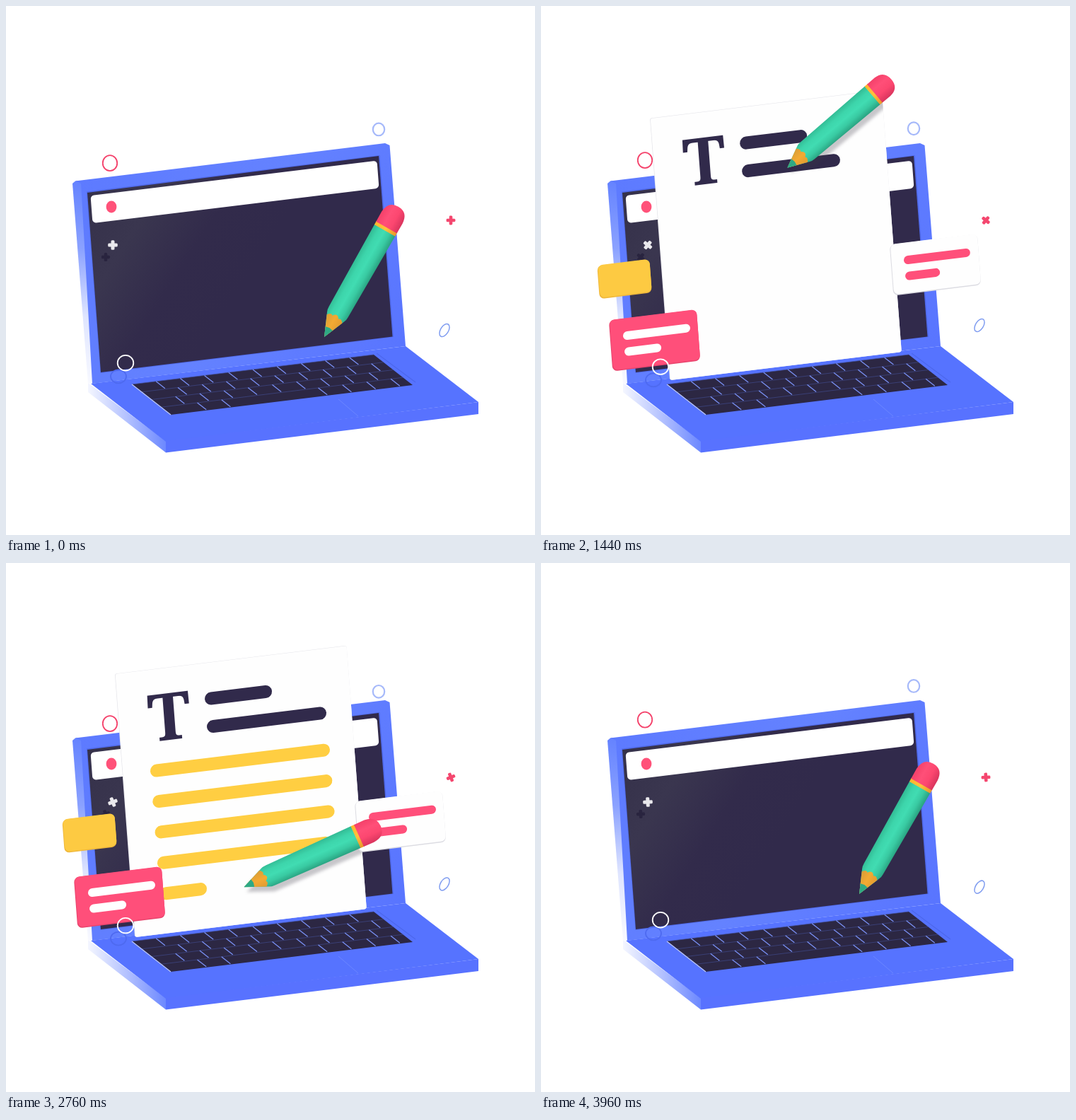
Recreate the animation shown at these times as an HTML page with a canvas. Size 748 by 748 pixels, loop 4000 ms.

```html
<!DOCTYPE html>
<html lang="en">
<head>
<meta charset="utf-8">
<title>Writing on a laptop</title>
<style>
  html, body { margin: 0; width: 100%; height: 100%; overflow: hidden; background: #fff; }
  canvas { display: block; }
</style>
</head>
<body>
<canvas id="stage" width="748" height="748"></canvas>
<script>
const ctx = document.getElementById('stage').getContext('2d');
const LOOP = 4000, NAVY = '#312a4b', PINK = '#ff4f7a', YELLOW = '#ffce42';
const PAPER = { x: 154.5, y: 156, w: 327, h: 373 };
const SLOPE = -.122, LEAN = .076;   // axes of every plane parallel to the screen

// Easing and timing
const clamp = v => Math.min(1, Math.max(0, v));
const span = (t, start, length) => clamp((t - start) / length);
const mix = (a, b, p) => a + (b - a) * p;
const easeOut = p => 1 - (1 - p) ** 3;
const easeInOut = p => p < .5 ? 4 * p ** 3 : 1 - 4 * (1 - p) ** 3;
const smooth = p => p * p * (3 - 2 * p);
const backOut = p => 1 + 2.3 * (p - 1) ** 3 + 1.3 * (p - 1) ** 2;
const wave = (t, delay) => Math.sin(Math.PI * (t - delay) / 1000);
const grow = (t, start, length = 400) => easeOut(span(t, start, length));

// Drawing helpers
function scoped(draw) {
  ctx.save();
  draw();
  ctx.restore();
}
function poly(fill, ...points) {
  ctx.beginPath();
  points.forEach(([x, y]) => ctx.lineTo(x, y));
  ctx.closePath();
  ctx.fillStyle = fill;
  ctx.fill();
}
function line(color, width, x1, y1, x2, y2) {
  ctx.beginPath();
  ctx.moveTo(x1, y1);
  ctx.lineTo(x2, y2);
  ctx.strokeStyle = color;
  ctx.lineWidth = width;
  ctx.stroke();
}
function box(fill, x, y, w, h, r) {
  ctx.beginPath();
  ctx.roundRect(x, y, w, h, r);
  ctx.fillStyle = fill;
  ctx.fill();
}
function ring(color, width, x, y, rx, ry, tilt = 0) {
  ctx.beginPath();
  ctx.ellipse(x, y, rx, ry, tilt, 0, 7);
  ctx.strokeStyle = color;
  ctx.lineWidth = width;
  ctx.stroke();
}
function blend(x1, y1, x2, y2, ...colors) {
  const g = ctx.createLinearGradient(x1, y1, x2, y2);
  colors.forEach((c, i) => g.addColorStop(i / (colors.length - 1), c));
  return g;
}
function onPlane(x, y, scale, draw) {
  scoped(() => {
    ctx.transform(scale, SLOPE * scale, LEAN * scale, scale, x, y);
    draw();
  });
}
function bar(color, width, x, y, length, amount) {
  if (amount <= 0) return;
  scoped(() => {
    ctx.lineCap = 'round';
    line(color, width * Math.min(1, amount * 6), x, y, x + length * amount, y);
  });
}
function plus(color, x, y, arm, width, t) {
  scoped(() => {
    ctx.translate(x, y);
    ctx.rotate(t / LOOP * 2 * Math.PI);
    box(color, -arm, -width / 2, 2 * arm, width, 1.5);
    box(color, -width / 2, -arm, width, 2 * arm, 1.5);
  });
}

function laptop() {
  // Base
  poly(blend(116, 0, 226, 0, '#f4f6ff', '#b3c1ff', '#6c88ff'), [116, 533], [226, 615], [226, 631.5], [116, 546]);
  poly('#5673ff', [120, 534], [565, 481], [668, 560], [226, 616]);
  poly('#5872ff', [226, 615], [668, 560], [668, 577], [226, 631.5]);
  // Lid
  poly(blend(95, 249, 116, 534, '#6583ff', '#8ba2ff', '#dfe5ff', '#f8f9ff'),
    [94, 251], [98, 247.5], [112, 247], [127, 532], [116, 534]);
  poly(blend(95, 249, 560, 480, '#5d7aff', '#6482ff', '#5975ff'),
    [98, 247.5], [536, 194], [542.5, 197], [565, 481], [122, 534], [106, 251]);
  poly('#4f69ea', [114, 262.5], [528.5, 211], [548, 468], [133.5, 519]);
  poly(blend(115, 263, 330, 400, '#35314a', '#3a364f', '#322b4b', NAVY),
    [115, 264], [527, 212], [546.5, 467.5], [134, 518]);
  onPlane(119.5, 268, 1, () => box('#fff', 0, 0, 405, 39, 5));
  ctx.beginPath();
  ctx.ellipse(149, 284, 7.4, 8.5, 0, 0, 7);
  ctx.fillStyle = '#ff5279';
  ctx.fill();
  keyboard();
  line('#6b86ff', 1, 470, 556, 498, 580);
  line('#4c67ec', 1.2, 524, 491, 579, 532);
}

function keyboard() {
  const at = (u, v) => [178 + 342 * u + 55 * v, 535 - 42 * u + 43 * v];
  poly('#2c2743', at(0, 0), at(1, 0), at(1, 1), at(0, 1));
  for (let row = 0; row < 4; row++) {
    const top = row / 4;
    line('#40498c', .7, ...at(0, top), ...at(1, top));
    for (let key = 1; key < 10; key++) {
      const u = (key + row % 2 / 2) / 10;
      const spaceBar = row === 3 && key > 2 && key < 6;
      if (!spaceBar) line('#7a91f5', 1.3, ...at(u, top), ...at(u, top + .23));
    }
  }
  line('#b9c6ff', 1.3, ...at(0, 0), ...at(0, 1));
}

// Lines of writing: heading beside the letter, then the body
const heading = i => ({ color: NAVY, x: 131.6, y: 51 + 39.5 * i, length: 77 + 74 * i, stroke: 1200 + 200 * i, lag: -125 });
const body = i => ({ color: YELLOW, x: 47.6, y: 142.8 + 43.4 * i, length: i < 4 ? 236 : 110, stroke: 1845 + 200 * i, lag: 45 });
const lines = [0, 1].map(heading).concat([0, 1, 2, 3, 4].map(body));

function paper(t, pose) {
  const settle = 3 * (1 - span(t, 1200, 1900));
  const rise = PAPER.h * (1 - easeOut(span(t, 300, 1000)));
  const drop = rise + settle + 378 * easeInOut(span(t, 3380, 440));
  const height = PAPER.h - drop;
  if (height <= 0) return;
  onPlane(PAPER.x + LEAN * drop, PAPER.y + drop, 1, () => {
    box('#e4e4e9', -.7, 0, PAPER.w + .7, height, 3);
    box('#fefefe', 0, .4, PAPER.w, height - .4, 3);
    ctx.clip();
    const letter = backOut(span(t, 677, 320));
    if (letter > 0) scoped(() => {
      ctx.translate(71, 68);
      ctx.scale(letter, letter);
      ctx.fillStyle = NAVY;
      ctx.font = 'bold 92px "Noto Serif", serif';
      ctx.textAlign = 'center';
      ctx.fillText('T', 0, 34);
    });
    for (const l of lines) bar(l.color, 18, l.x, l.y, l.length, grow(t, l.stroke + l.lag));
    // Pencil shadow, kept inside the sheet
    ctx.setTransform(1, 0, 0, 1, 4, 7);
    ctx.filter = 'blur(2px)';
    inPose(pose, () => {
      pencilShape();
      ctx.fillStyle = 'rgba(60,55,70,.28)';
      ctx.fill();
    });
  });
}

function card(t, x, y, w, h, start, color, side, ink, inkStart) {
  const scale = backOut(span(t, start, 400)) * (1 - easeInOut(span(t, 3400, 320)));
  if (scale <= .01) return;
  onPlane(x, y, scale, () => {
    box(side, -w / 2 - 1, -h / 2 + .5, w + 1, h + 1, 7);
    box(color, -w / 2, -h / 2, w, h, 7);
    if (!ink) return;
    bar(ink, 12, -38.2, -10.7, 83, grow(t, inkStart, 450));
    bar(ink, 12, -37.8, 11.8, 40, grow(t, inkStart + 80, 450));
  });
}

function floaters(t) {
  ring('#f4426b', 1.8, 147, 223 + 5.2 * wave(t, 50), 10.2, 11);
  ring('#a6b9fa', 2.2, 527, 177 + 5 * wave(t, 170), 8.2, 8.8);
  ring('#7f9cf0', 1.5, 620, 454.8 + 4.6 * wave(t, -300), 5.6, 10, .55);
  ring('#fff', 1.8, 169, 509.3 + 4.6 * wave(t, 500), 11.3, 10.8);
  plus('#e9e8ec', 151, 338, 6.8, 5, t);
  plus('#f4476f', 629, 303, 6.4, 4.6, t);
}
function floaterShadows(t) {
  plus('#29243f', 141, 355, 6, 4.5, t);
  ring('#4e6af0', 1.8, 159, 528 + 4.2 * wave(t, 500), 11, 9.5);
}

// Pencil path: it rests, rises, writes each line from end to end, and returns
const stop = (t, x, y, angle) => ({ t, x, y, angle });
const tipOn = (t, x, y, angle) =>
  stop(t, PAPER.x + x + LEAN * y, PAPER.y + SLOPE * x + y + 5, angle);
const rest = t => stop(t, 450, 468, -60.4);
const strokes = lines.flatMap(l => [
  tipOn(l.stroke, l.x, l.y, -44),
  tipOn(l.stroke + 100, l.x + l.length, l.y, l.color === NAVY ? -34 : -24)
]);
const path = [
  rest(0), rest(80), stop(680, 310, 218, -42), tipOn(860, 45, 50, -48), tipOn(1000, 75, 100, -50),
  ...strokes, stop(1800, 235, 299, -55.8), stop(3200, 401, 456, -37.3), rest(3520), rest(LOOP)
].sort((a, b) => a.t - b.t);

function poseAt(t) {
  const next = path.findIndex(s => s.t > t);
  const a = path[next - 1], b = path[next];
  const p = smooth(span(t, a.t, b.t - a.t));
  const y = mix(a.y, b.y, p);
  // Lower down the pencil is nearer and looks longer
  const length = 193 + 19 * smooth(span(y, 260, 210));
  return { x: mix(a.x, b.x, p), y, angle: mix(a.angle, b.angle, p), length };
}
function inPose({ x, y, angle, length }, draw) {
  scoped(() => {
    ctx.translate(x, y);
    ctx.rotate(angle * Math.PI / 180);
    ctx.scale(length / 213, 1);
    draw();
  });
}
function pencilShape() {
  ctx.beginPath();
  ctx.moveTo(0, 0);
  ctx.lineTo(33, -14);
  ctx.quadraticCurveTo(36, -15.5, 41, -15.5);
  ctx.lineTo(195, -17);
  ctx.quadraticCurveTo(213, -16, 213, 0);
  ctx.quadraticCurveTo(213, 16, 195, 17);
  ctx.lineTo(41, 15.5);
  ctx.quadraticCurveTo(36, 15.5, 33, 14);
  ctx.closePath();
}
function pencil(pose) {
  inPose(pose, () => {
    const across = (...colors) => blend(0, -16, 0, 16, ...colors);
    pencilShape();
    ctx.clip();
    ctx.fillStyle = across('#33bd96', '#3dd5ab', '#41dcb2', '#39caa2', '#2aa583');
    ctx.fillRect(0, -18, 175, 36);
    // Bare wood with a scalloped edge, then the lead
    ctx.beginPath();
    ctx.moveTo(0, 0);
    ctx.lineTo(28, -14);
    ctx.quadraticCurveTo(36, -8, 32, -5);
    ctx.quadraticCurveTo(40, 0, 32, 5);
    ctx.quadraticCurveTo(36, 8, 28, 14);
    ctx.fillStyle = across('#d39a38', '#f3aa33', '#dc9730');
    ctx.fill();
    poly('#2fa984', [0, -9], [13, -9], [15, 0], [13, 9], [0, 9]);
    ctx.fillStyle = across('#ffb52e', '#ffc23d', '#e9992a');
    ctx.fillRect(174, -18, 6, 36);
    ctx.fillStyle = across('#f5426b', '#ff4f78', '#fc4770', '#dc365f');
    ctx.fillRect(179, -18, 36, 36);
  });
}

function render(t) {
  const pose = poseAt(t);
  ctx.fillStyle = '#fff';
  ctx.fillRect(0, 0, 748, 748);
  laptop();
  floaterShadows(t);
  paper(t, pose);
  card(t, 558, 365, 123, 71, 440, '#fefefe', '#dcdce2', PINK, 1100);
  card(t, 118.5, 385.5 + 5.5 * wave(t, 1460), 73, 46, 500, '#fdca42', '#efb83c');
  card(t, 161, 472, 123, 71, 440, PINK, '#e8446d', '#fff', 850);
  floaters(t);
  pencil(pose);
}
function tick() {
  render(performance.now() % LOOP);
  requestAnimationFrame(tick);
}
tick();
</script>
</body>
</html>
```
